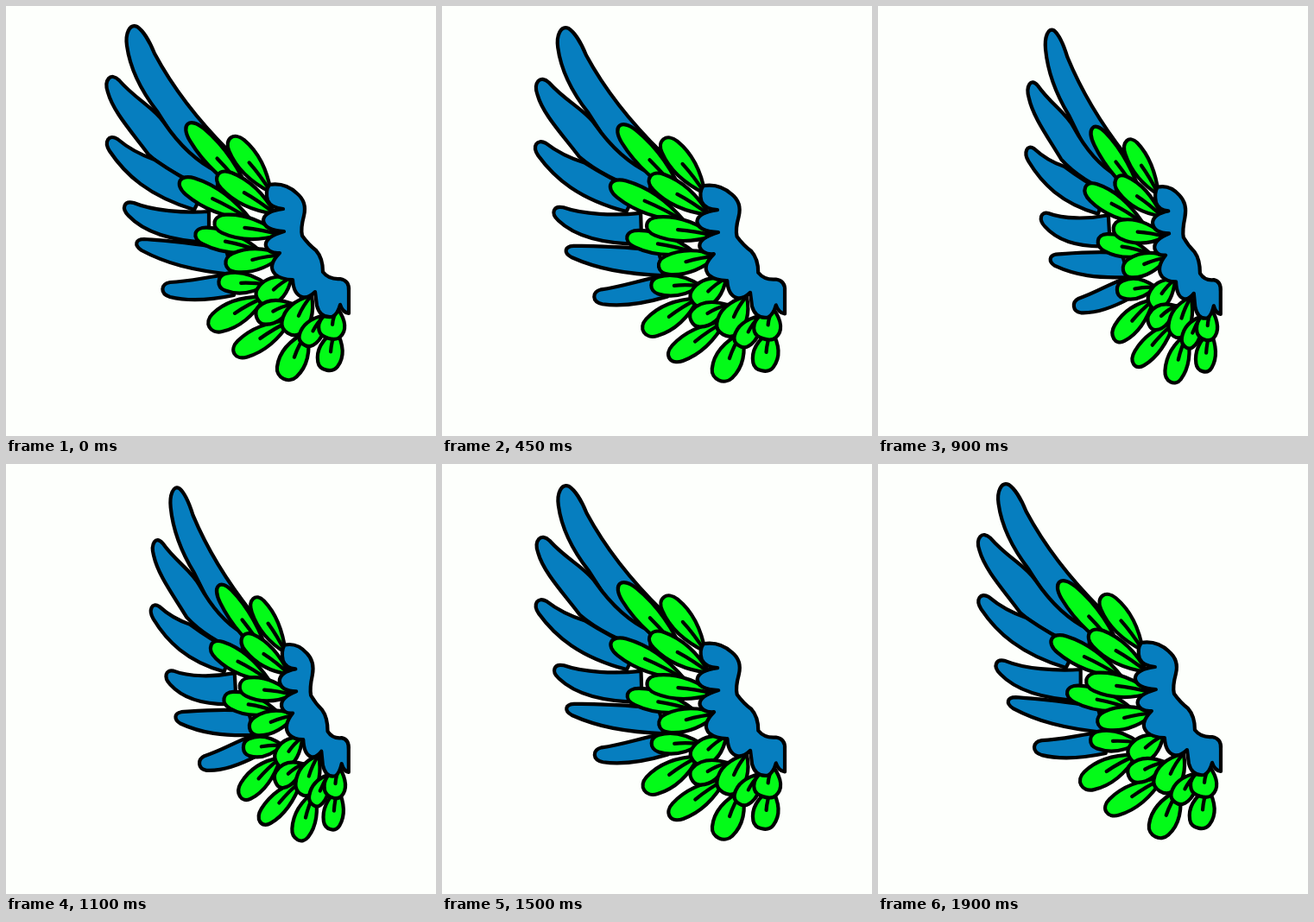
Animation, 498 px wide and 498 px high, one loop 1.95 s. Source, as an HTML page:

```html
<!DOCTYPE html>
<html lang="en">
<head>
<meta charset="utf-8">
<title>Flapping wing</title>
<style>
  html, body { margin: 0; width: 100%; height: 100%; overflow: hidden; background: #fdfffc; }
  svg { display: block; width: 498px; height: 498px; filter: blur(.5px); }
  path { stroke: #000; stroke-width: 4.2; stroke-linejoin: round; stroke-linecap: round; vector-effect: non-scaling-stroke; }
  .blue { fill: #067ebf; }
  .green { fill: #03fb18; }
  .rib { fill: none; }
</style>
</head>
<body>
<svg viewBox="0 0 498 498"><g id="wing"></g></svg>
<script>
const LOOP = 1950, STEP = 50, ROOT_X = 396;
const wing = document.getElementById('wing');
const moving = [];

function add(tag, attrs, parent = wing) {
  const el = document.createElementNS('http://www.w3.org/2000/svg', tag);
  for (const key in attrs) el.setAttribute(key, attrs[key]);
  return parent.appendChild(el);
}

function feather(x, y, swing) {
  const el = add('g', {});
  moving.push({ el, x, y, swing });
  return el;
}

// Long feathers: pivot x, pivot y, swing in degrees, outline
const long = [
  [235, 175, -1, 'M258 168C225 135 195 98 172 55C166 40 158 28 152 24C143 20 138 32 140 46C144 75 158 100 175 122L215 185Z'],
  [240, 200, 0, 'M245 192C220 180 200 160 183 135C172 118 150 108 131 86C121 76 113 86 118 100C124 122 145 145 165 172C185 190 210 203 245 215Z'],
  [222, 222, 3, 'M230 212C205 200 185 187 172 178C155 172 142 165 129 154C119 148 113 157 120 168C138 195 165 220 218 236Z'],
  [235, 257, 4, 'M235 238C205 240 170 237 148 228C137 225 133 234 142 243C160 262 190 272 235 274Z'],
  [258, 298, 7, 'M255 282C220 274 185 272 160 270C150 270 148 277 157 283C185 298 215 306 262 311Z'],
  [262, 324, 11, 'M262 311C240 312 215 319 190 320C179 322 178 333 190 337C210 342 235 341 264 335Z']
];

// Short feathers, back row first: base x, base y, tip x, tip y, half width, swing
const short = [
  [285, 224, 210, 136, 12, 0],
  [284, 248, 201, 202, 12, 2],
  [295, 284, 219, 263, 11, 3],
  [303, 323, 246, 319, 11, 6],
  [300, 337, 235, 372, 13, 9],
  [330, 364, 264, 403, 12, 8],
  [349, 377, 321, 432, 14, 3],
  [382, 375, 371, 422, 13, 0],
  [307, 216, 260, 152, 12, 0],
  [312, 241, 245, 195, 12, 1],
  [318, 265, 241, 250, 12, 2],
  [322, 288, 254, 299, 12, 3],
  [331, 314, 292, 341, 13, 5],
  [332, 345, 290, 361, 12, 7],
  [354, 335, 326, 379, 14, 3],
  [369, 358, 344, 392, 11, 2],
  [384, 350, 373, 385, 14, 0]
];

const shoulder = 'M305 207Q323 204 337 217Q349 227 345 243Q341 258 343 266Q350 276 359 283Q367 292 367 308' +
  'Q374 317 387 316Q398 318 397 330L397 356Q390 355 387 346Q384 357 378 360Q364 362 360 347L358 331' +
  'Q350 339 343 337Q333 334 332 317Q319 317 312 311Q302 301 317 286Q304 287 301 278Q299 268 322 261' +
  'Q299 260 298 248Q299 238 321 235Q307 234 303 225Q300 214 305 207Z';

for (const [x, y, swing, d] of long) add('path', { class: 'blue', d }, feather(x, y, swing));

for (const [x, y, tipX, tipY, w, swing] of short) {
  const len = Math.hypot(tipX - x, tipY - y);
  const angle = Math.atan2(tipY - y, tipX - x) * 180 / Math.PI;
  const [a, b, c, tip] = [.3, .6, .85, 1.04].map(k => k * len);
  const local = add('g', { transform: `translate(${x} ${y}) rotate(${angle})` }, feather(x, y, swing));
  add('path', {
    class: 'green',
    d: `M0 0C${a} ${-w} ${b} ${-w * 1.3} ${c} ${-w * .9}` +
       `C${tip} ${-w * .6} ${tip} ${w * .6} ${c} ${w * .9}C${b} ${w * 1.3} ${a} ${w} 0 0Z`
  }, local);
  add('path', { class: 'rib', d: `M0 0Q${a} ${w * .15} ${len * .54} 0` }, local);
}

add('path', { class: 'blue', d: shoulder });

// Horizontal spread: one deep fold, then a small bob
function spread(t) {
  const start = 380, fold = 1200;
  const u = (t - start + LOOP) % LOOP;
  return u < fold
    ? .91 + .125 * Math.cos(2 * Math.PI * u / fold)
    : 1.0175 + .0175 * Math.cos(2 * Math.PI * (u - fold) / (LOOP - fold));
}

function draw(now) {
  const t = Math.floor(now % LOOP / STEP) * STEP;
  const s = spread(t);
  const droop = (1 - Math.cos(2 * Math.PI * t / LOOP)) / 2;
  const tilt = .02 * droop;
  wing.setAttribute('transform',
    `matrix(${s} ${-tilt} 0 1 ${ROOT_X * (1 - s)} ${droop + tilt * ROOT_X})`);
  for (const { el, x, y, swing } of moving) {
    el.setAttribute('transform', `rotate(${-swing * droop} ${x} ${y})`);
  }
}

const begin = performance.now();
function tick() {
  draw(performance.now() - begin);
  requestAnimationFrame(tick);
}
tick();
</script>
</body>
</html>
```
